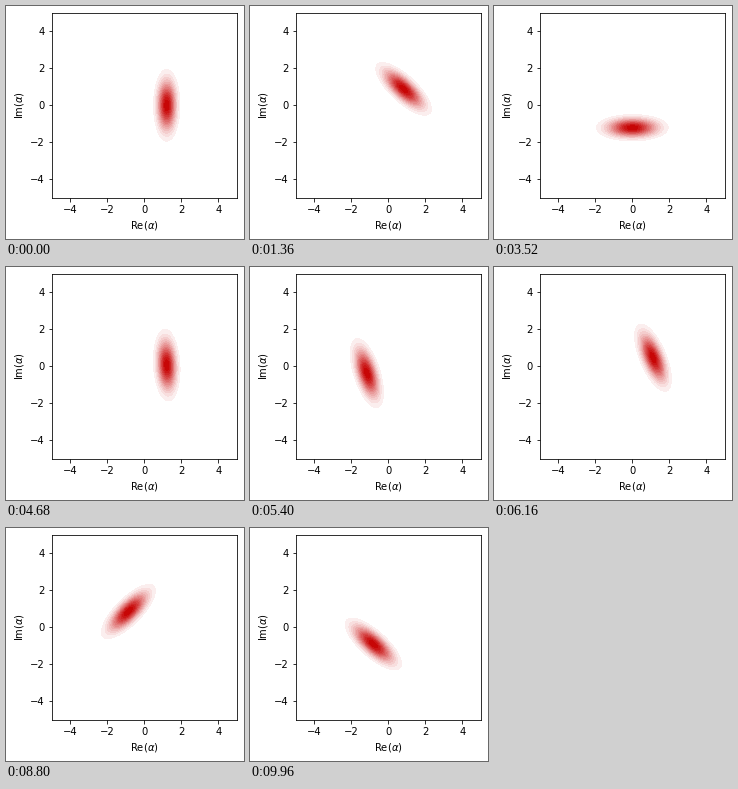
Animation, 238 px wide and 233 px high, one loop 10 s. Source, as a matplotlib script:

```python
import numpy as np
import matplotlib.pyplot as plt
from matplotlib.animation import FuncAnimation
from matplotlib.collections import PolyCollection

WIDTH, HEIGHT, DPI = 238, 233, 72
LEFT, BOTTOM, SIDE = 45.8, 41.2, 185
FRAMES, INTERVAL = 250, 40
T_END = 40                       # phase covered by the loop, in radians

SQUEEZE = 0.5
CENTER = 2 * np.exp(-SQUEEZE)    # displaced first, squeezed after
PEAK = 2 / np.pi
LEVELS = 0.04 * np.arange(1, 16)
PEAK_COLOR = np.array([199, 6, 6]) / 255

plt.rcParams["font.family"] = "DejaVu Sans"
plt.rcParams["font.size"] = 10


def contour(level):
    """Contour of the Wigner function at zero time, as complex points."""
    radius = np.sqrt(np.log(PEAK / level) / 2)
    phi = np.linspace(0, 2 * np.pi, 120, endpoint=False)
    re = CENTER + radius * np.exp(-SQUEEZE) * np.cos(phi)
    im = radius * np.exp(SQUEEZE) * np.sin(phi)
    return re + 1j * im


def band_color(level):
    return 1 + level / LEVELS[-1] * (PEAK_COLOR - 1)


fig = plt.figure(figsize=(WIDTH / DPI, HEIGHT / DPI), dpi=DPI, facecolor="white")
ax = fig.add_axes([LEFT / WIDTH, BOTTOM / HEIGHT, SIDE / WIDTH, SIDE / HEIGHT])
ax.set(xlim=(-5, 5), ylim=(-5, 5))
ax.set_xticks(range(-4, 5, 2))
ax.set_yticks(range(-4, 5, 2))
ax.set_xlabel(r"Re($\alpha$)")
ax.set_ylabel(r"Im($\alpha$)")

shapes = [contour(level) for level in LEVELS]
bands = PolyCollection([], facecolors=[band_color(v) for v in LEVELS],
                       edgecolors="none", antialiaseds=False)
ax.add_collection(bands)


def update(i):
    turn = np.exp(-1j * T_END * i / (FRAMES - 1))
    points = [shape * turn for shape in shapes]
    bands.set_verts([np.column_stack([p.real, p.imag]) for p in points])
    return [bands]


anim = FuncAnimation(fig, update, frames=FRAMES, interval=INTERVAL,
                     repeat=True, repeat_delay=0, blit=False)
plt.show()
```
